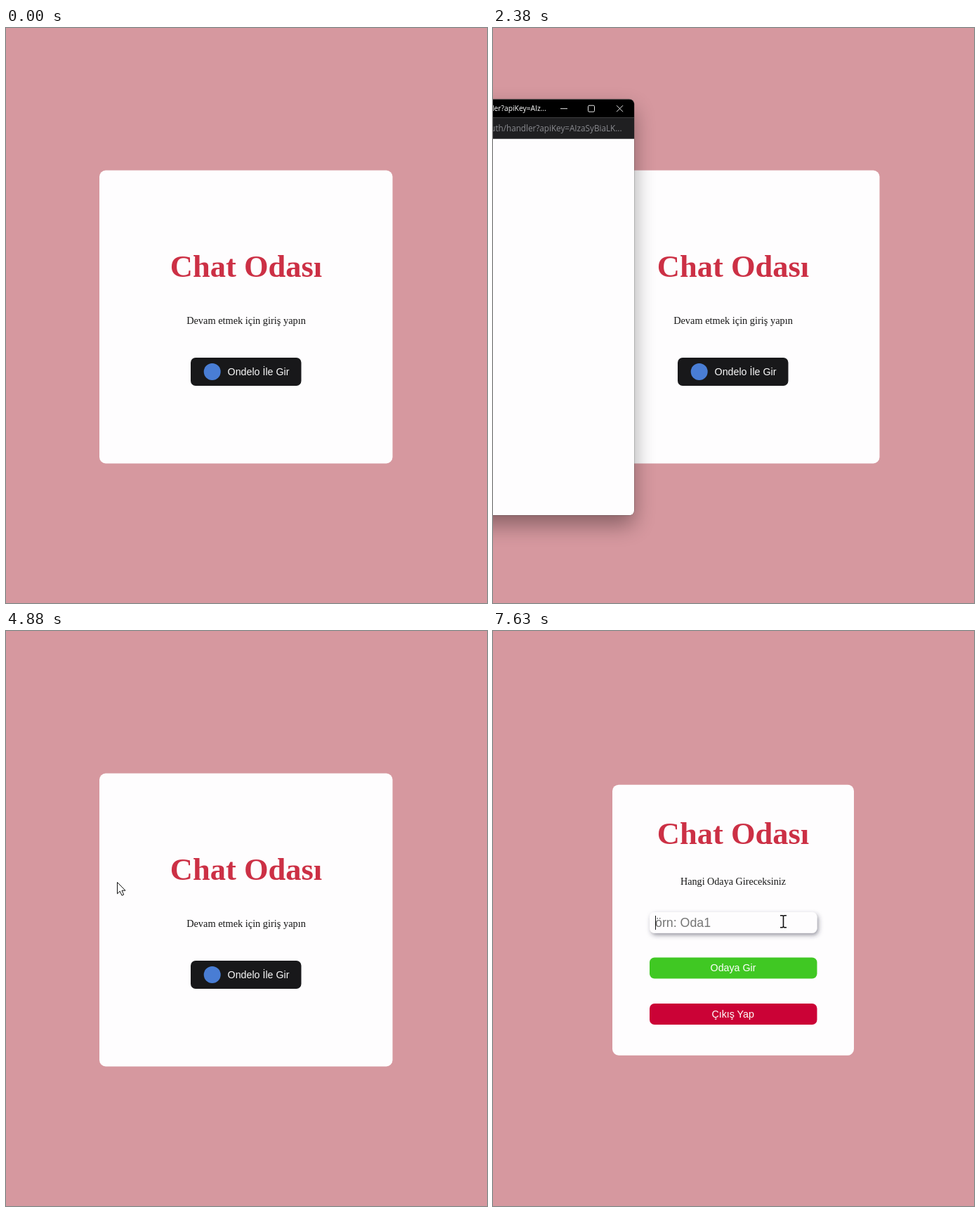
These frames come from a looping animation (685x818 px, 8 s). An HTML page:

```html
<!DOCTYPE html>
<html lang="tr">
<head>
<meta charset="utf-8">
<title>Chat Odası</title>
<style>
  html, body { margin: 0; width: 100%; height: 100%; overflow: hidden; background: #d6989f; }
  svg { display: block; width: 100%; height: 100%; }
  .serif { font-family: "Liberation Serif", "Times New Roman", serif; text-anchor: middle; fill: #151515; }
  .sans { font-family: "Liberation Sans", Arial, sans-serif; font-size: 14.24px; fill: #fff; }
  .mid { text-anchor: middle; }
  .title { font-size: 44.5px; font-weight: 700; fill: #cc3045; }
  .bar { font-family: "Open Sans", "Noto Sans", sans-serif; text-anchor: end; }
  .card { fill: #fefdfe; }
  .pointer { fill: #fff; stroke: #111; stroke-width: 1; stroke-linejoin: round; }
</style>
</head>
<body>
<svg viewBox="0 0 685 818">
  <defs>
    <filter id="soft" x="-30%" y="-30%" width="160%" height="160%"><feGaussianBlur stdDeviation="15"/></filter>
    <filter id="fieldShadow" x="-20%" y="-60%" width="140%" height="240%">
      <feDropShadow dx="2" dy="3" stdDeviation="3.2" flood-color="#334" flood-opacity=".5"/>
    </filter>
    <clipPath id="frame"><rect x="-500" width="500" height="592" rx="7"/></clipPath>
  </defs>
  <rect width="685" height="818" fill="#d6989f"/>

  <g id="login">
    <rect class="card" x="133" y="202.5" width="417.5" height="417" rx="9"/>
    <text class="serif title" x="342" y="354">Chat Odası</text>
    <text class="serif" x="342" y="421" font-size="14.35">Devam etmek için giriş yapın</text>
    <rect id="button" x="263" y="469" width="157.5" height="40" rx="7"/>
    <g id="label">
      <circle cx="293.7" cy="489" r="12" fill="#4a80d8"/>
      <text class="sans" x="315.6" y="493.5">Ondelo İle Gir</text>
    </g>
  </g>

  <g id="room">
    <rect class="card" x="170" y="218.7" width="344" height="385" rx="9"/>
    <text class="serif title" x="342" y="303">Chat Odası</text>
    <text class="serif" x="342" y="361.3" font-size="14.15">Hangi Odaya Gireceksiniz</text>
    <rect x="223" y="400" width="238.5" height="29.8" rx="7" fill="#fefdfe" filter="url(#fieldShadow)"/>
    <text class="sans" x="231" y="421" style="font-size:17.8px;fill:#757575">örn: Oda1</text>
    <rect id="caret" x="231" y="405" width="1" height="20" fill="#111"/>
    <rect x="223" y="464.5" width="238.5" height="30" rx="7" fill="#40c823"/>
    <text class="sans mid" x="342" y="484.3">Odaya Gir</text>
    <rect x="223" y="530" width="238.5" height="30" rx="7" fill="#cb0236"/>
    <text class="sans mid" x="341.7" y="549.8">Çıkış Yap</text>
  </g>

  <!-- popup: local origin at its top right corner -->
  <g id="popup">
    <rect x="-500" y="14" width="500" height="592" rx="8" opacity=".36" filter="url(#soft)"/>
    <rect x="-500.5" y="-.5" width="501" height="593" rx="7.5" opacity=".3"/>
    <g clip-path="url(#frame)">
      <rect x="-500" width="500" height="592" fill="#fefdfe"/>
      <rect x="-500" width="500" height="26.5"/>
      <rect x="-500" y="26.5" width="500" height="30" fill="#1f1f21"/>
      <g fill="none" stroke="#e6e6e6" stroke-width="1">
        <path d="M-105 13.5h10M-25 9l9 9m0-9l-9 9"/>
        <rect x="-65.5" y="9" width="9" height="9" rx="1.5"/>
      </g>
      <g id="address">
        <text class="bar" x="-125" y="17" font-size="10.3" font-weight="500" fill="#fff">handler?apiKey=AIz...</text>
        <text class="bar" x="-17.5" y="45.8" font-size="11.7" fill="#8a8b90">auth/handler?apiKey=AIzaSyBiaLK...</text>
      </g>
      <g id="progress">
        <rect x="-500" y="56.5" width="500" height="4" fill="#cbc5d6"/>
        <rect id="runner" y="56.5" width="90" height="4" fill="#4d4391"/>
      </g>
    </g>
  </g>

  <g id="cursor">
    <path id="arrow" class="pointer" d="M.5 .5V16.8L4.3 13.2L7 19.2L9.7 18L7 12.2H12Z"/>
    <path id="hand" class="pointer" d="M0 1.8C0-.3 3.2-.3 3.2 1.8V7.2C4-.0 4 6 6 6.5C7 6 8.5 6.5 8.8 7.6C10 7 11.4 7.8 11.4 9.2V14.5C11.4 17 10.2 18 10 21.5H1.4C1 18.8-1.6 16.5-4.2 12.6C-5.2 10.6-2.8 9.6-1.4 11.2L0 12.8Z"/>
    <g id="beam" fill="none">
      <path d="M-4.5-8.5h3.3L0-7.5l1.2-1h3.3M0-7.5V7.5M-4.5 8.5h3.3L0 7.5l1.2 1h3.3" stroke="#111" stroke-width="1.6"/>
    </g>
    <path id="resize" class="pointer" d="M0 0L5.5-5.5V-1.8H14.5V-5.5L20 0L14.5 5.5V1.8H5.5V5.5Z"/>
  </g>
</svg>
<script>
  const LOOP = 8000;
  const $ = id => document.getElementById(id);
  const show = (id, on) => $(id).setAttribute('display', on ? 'inline' : 'none');
  const between = (t, a, b) => t >= a && t < b;
  const last = (keys, t) => keys.filter(k => k[0] <= t).pop();

  // time, shape, x, y
  const pointerKeys = [
    [0, ''],
    [1380, 'resize', 677, 550], [1500, 'arrow', 540, 522],
    [1630, 'hand', 400, 497], [1750, 'hand', 380, 491.5],
    [2250, ''],
    [4880, 'arrow', 158, 357], [5000, 'arrow', 180, 355],
    [5130, 'arrow', 207, 353], [5250, 'arrow', 230, 352],
    [5500, 'arrow', 246, 347], [5630, 'arrow', 450, 363],
    [5750, 'arrow', 617, 379],
    [6630, 'arrow', 606, 384], [6750, 'arrow', 580, 392],
    [6880, 'arrow', 550, 400], [7000, 'arrow', 515, 407],
    [7130, 'arrow', 481, 411],
    [7250, 'beam', 432, 415], [7380, 'beam', 413, 414], [7630, 'beam', 413.5, 413.2]
  ];

  // time, right edge, top, scale, opacity
  const popupKeys = [
    [1880, 183, 122, .93, .55], [2000, 194, 109.8, .973, 1],
    [2130, 195, 109.3, .975, 1], [2250, 201, 101.2, 1, 1],
    [2880, 187, 101.2, 1, 1], [3000, 5, 101.2, 1, 1]
  ];

  function drawPointer(t) {
    const [, shape, x, y] = last(pointerKeys, t);
    for (const id of ['arrow', 'hand', 'beam', 'resize']) show(id, id === shape);
    if (shape) $('cursor').setAttribute('transform', `translate(${x} ${y})`);
  }

  function drawPopup(t) {
    const open = between(t, 1880, 3130);
    show('popup', open);
    if (!open) return;
    const [, right, top, scale, opacity] = last(popupKeys, t);
    $('popup').setAttribute('transform', `translate(${right} ${top}) scale(${scale})`);
    $('popup').setAttribute('opacity', opacity);
    show('address', t >= 2380);
    show('progress', t >= 2500);
    const tick = Math.floor((t - 2880) / 125 + .05) * 125;
    $('runner').setAttribute('x', -274 + tick * .4);
  }

  function draw(t) {
    const hover = between(t, 1630, 2250);
    show('login', t < 6500);
    show('room', t >= 6500);
    $('button').setAttribute('fill', hover ? '#202022' : '#18181a');
    $('label').setAttribute('opacity', hover ? .66 : .98);
    show('caret', t >= 7380);
    drawPopup(t);
    drawPointer(t);
  }

  const start = performance.now();
  function tick() {
    draw((performance.now() - start) % LOOP);
    requestAnimationFrame(tick);
  }
  tick();
</script>
</body>
</html>
```
